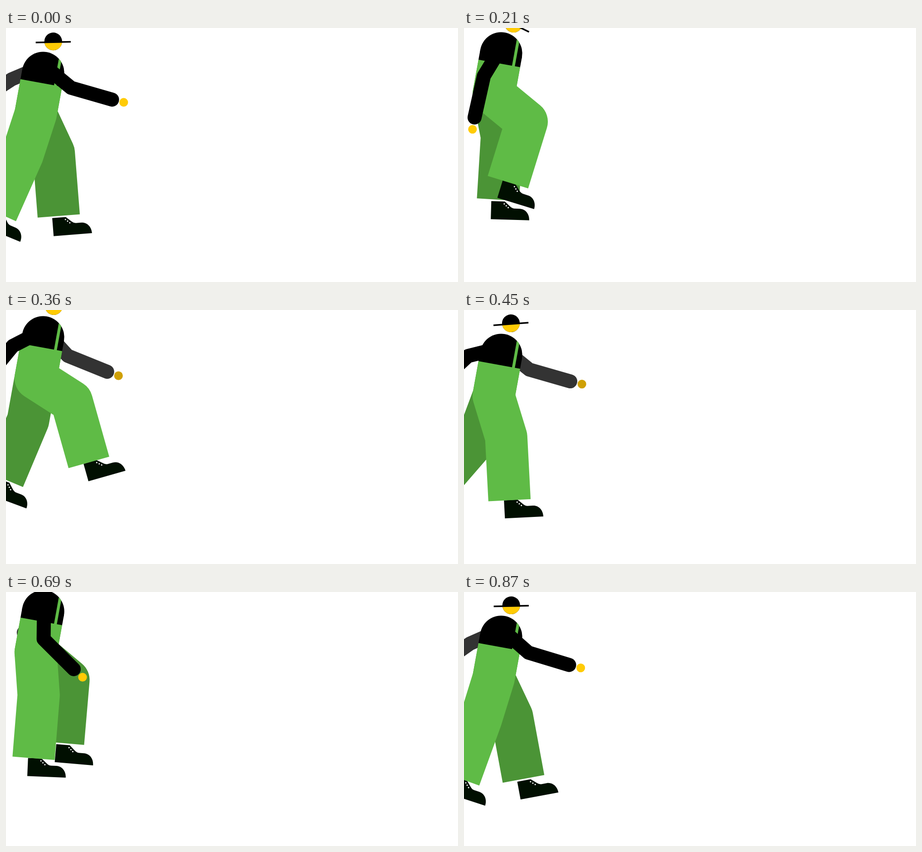
Animation, 998 px wide and 561 px high, one loop 900 ms. Source, as an HTML page with a canvas:

```html
<!DOCTYPE html>
<html lang="en">
<head>
<meta charset="utf-8">
<title>Walk cycle</title>
<style>
  html, body { margin: 0; width: 100%; height: 100%; overflow: hidden; background: #fff; }
  canvas { display: block; }
</style>
</head>
<body>
<canvas id="stage" width="998" height="561"></canvas>
<script>
const ctx = document.getElementById('stage').getContext('2d');

const LOOP = 900, STEP = 30;
const GREEN = '#5fbb46', SHADE = '#4b9436', BLACK = '#000', GREY = '#333';
const YELLOW = '#ffcb05', OCHRE = '#cfa005', BOOT = '#010f01';
const WIDE = 93.4, SLEEVE = 31, LEAN = 10.3;
const THIGH = 94.5, SHIN = 140, UPPER = 77.5, FORE = 94, REACH = 120.4;
const CHEST = [82, 98.8], HIP = [65.5, 189.5], SHOULDER = [84, 82.5], NECK = [98.7, 42];

// Key poses: [time, upper angle, lower angle], in degrees forward from straight down.
const nearLeg = [[0, -18, -24], [120, 7, -66], [270, 68, 13.6], [330, 66, 18], [450, 17, 3], [570, 17, 2], [690, 4, -4.6]];
const farLeg = [[0, 25, 4.5], [120, 18.4, 1.2], [270, 5, -8.4], [450, -20.5, -41], [570, -2.3, -62], [690, 50, -4.9], [750, 64, 10], [870, 25.3, 10.5]];
const nearArm = [[0, 50.5, 74], [120, -13.6, 11.5], [270, -41, -24], [450, -76, -47], [570, -32, -3], [690, -0.7, 45]];
const farArm = [[0, -67, -57], [120, -48.7, -0.6], [270, 23.3, 54.3], [450, 51, 74], [570, -2.7, 56.3]];

const rad = deg => deg * Math.PI / 180;
const reach = ([x, y], deg, len) => [x + len * Math.sin(rad(deg)), y + len * Math.cos(rad(deg))];

function ease(t, from, to) {
  const u = Math.min(1, Math.max(0, (t - from) / (to - from)));
  return u * u * (3 - 2 * u);
}

// One hop per half loop.
function bounce(t) {
  const p = t % (LOOP / 2);
  return 0.4 - 71 * (ease(p, 84, 304) - ease(p, 304, 424));
}

// The head dips after the first step and tips back a little for the second.
function nod(t) {
  return 27 * (ease(t, 0, 135) - ease(t, 200, 430)) - 3.2 * (ease(t, 380, 440) - ease(t, 600, 870));
}

// The foot drops slightly as it pushes off, late in its stride.
const pushOff = phase => -2.5 * Math.max(0, Math.cos(2 * Math.PI * (phase / LOOP - 0.85)));

// Smooth periodic interpolation without overshoot.
function sample(keys, t) {
  const n = keys.length;
  const at = i => keys[(i + n) % n];
  const clock = i => at(i)[0] + LOOP * Math.floor(i / n);
  let i = n - 1;
  while (keys[i][0] > t) i--;
  const span = clock(i + 1) - clock(i), u = (t - clock(i)) / span;
  const slope = (k, c) => (at(k + 1)[c] - at(k)[c]) / (clock(k + 1) - clock(k));
  const tangent = (k, c) => {
    const a = slope(k - 1, c), b = slope(k, c);
    return a * b > 0 ? 2 * a * b / (a + b) : 0;
  };
  return [1, 2].map(c => {
    const v = at(i)[c], d = at(i + 1)[c] - v;
    const m0 = tangent(i, c) * span, m1 = tangent(i + 1, c) * span;
    return v + u * (m0 + u * (3 * d - 2 * m0 - m1 + u * (m0 + m1 - 2 * d)));
  });
}

function line(points, width, color, cap = 'butt') {
  ctx.beginPath();
  points.forEach(p => ctx.lineTo(...p));
  ctx.lineWidth = width;
  ctx.strokeStyle = color;
  ctx.lineCap = cap;
  ctx.lineJoin = 'round';
  ctx.stroke();
}

function disc(x, y, r, color, from = 0, to = 2 * Math.PI) {
  ctx.beginPath();
  ctx.arc(x, y, r, from, to);
  ctx.fillStyle = color;
  ctx.fill();
}

function placed([x, y], deg, draw) {
  ctx.save();
  ctx.translate(x, y);
  ctx.rotate(rad(deg));
  draw();
  ctx.restore();
}

const bootShape = new Path2D('M0 0V-40H30L42 -29.3Q46 -25.5 51 -25H63C76 -25 85 -14 85 0Z');

function boot(ankle, deg, x, y) {
  placed(ankle, deg, () => {
    ctx.translate(x, y);
    ctx.fillStyle = BOOT;
    ctx.fill(bootShape);
    for (let i = 0; i < 3; i++) disc(28.8 + 4.5 * i, -34.6 + 4 * i, 1.5, '#fff');
  });
}

function leg(start, hip, [thigh, shin], roll, color, bootX, bootY) {
  const knee = reach(hip, thigh, THIGH), end = reach(knee, shin, SHIN);
  boot(end, roll - shin, bootX, bootY);
  line([start, hip, knee, end], WIDE, color);
}

function arm(shoulder, [upper, fore], sleeve, skin) {
  const elbow = reach(shoulder, upper, UPPER);
  line([shoulder, elbow, reach(elbow, fore, FORE)], SLEEVE, sleeve, 'round');
  disc(...reach(elbow, fore + 0.6, REACH), 9.6, skin);
}

function torso(chest) {
  placed(chest, LEAN, () => {
    disc(0, 0, WIDE / 2, BLACK);
    ctx.fillRect(-WIDE / 2, 0, WIDE, 23.5);
    ctx.beginPath();
    ctx.arc(0, 0, WIDE / 2, Math.PI, 0);
    ctx.rect(-WIDE / 2, 0, WIDE, 24);
    ctx.clip();
    ctx.fillStyle = GREEN;
    ctx.fillRect(28.5, -50, 6.4, 75);
  });
}

function head(neck, deg) {
  placed(neck, deg - 1, () => {
    ctx.translate(5.8, -12.6);
    disc(0, 0, 19.6, BLACK);
    const a = Math.asin(1.7 / 19.6);
    disc(0, 0, 19.6, YELLOW, a, Math.PI - a);
    line([[-38.7, 1.5], [38.7, 1.5]], 3.5, BLACK);
  });
}

function draw(t) {
  const dy = bounce(t);
  const lift = ([x, y]) => [x, y + dy];
  const chest = lift(CHEST), hip = lift(HIP), shoulder = lift(SHOULDER);
  const bib = reach(chest, -LEAN, 22.6);

  ctx.fillStyle = '#fff';
  ctx.fillRect(0, 0, 998, 561);
  arm(shoulder, sample(farArm, t), GREY, OCHRE);
  leg(bib, hip, sample(farLeg, t), pushOff(t + LOOP / 2), SHADE, -14.7, 43.6);
  torso(chest);
  leg(bib, hip, sample(nearLeg, t), pushOff(t), GREEN, -12.2, 39.7);
  arm(shoulder, sample(nearArm, t), BLACK, YELLOW);
  head(lift(NECK), nod(t));
}

function tick(now) {
  draw(Math.floor((now + 0.5) / STEP) * STEP % LOOP);
  requestAnimationFrame(tick);
}

draw(0);
requestAnimationFrame(tick);
</script>
</body>
</html>
```
